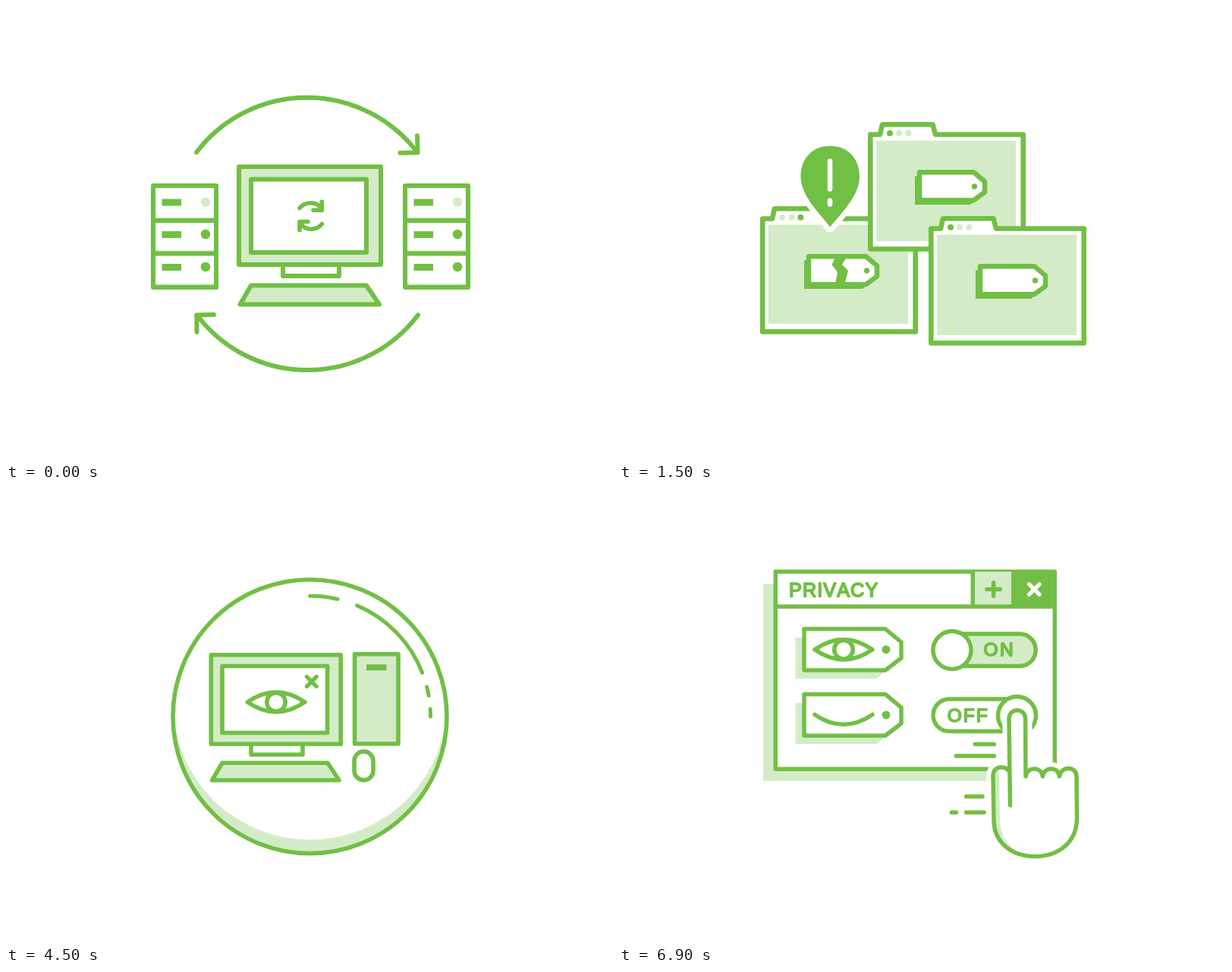
Animation, 800 px wide and 600 px high, one loop 7.5 s. Source, as an HTML page with a canvas:

```html
<!DOCTYPE html>
<html lang="en">
<head>
<meta charset="utf-8">
<title>Privacy icons</title>
<style>
html, body { margin: 0; width: 100%; height: 100%; overflow: hidden; background: #fff; }
canvas { display: block; width: 800px; height: 600px; }
</style>
</head>
<body>
<canvas id="stage" width="800" height="600"></canvas>
<script>
const ctx = document.getElementById('stage').getContext('2d');
const GREEN = '#71bf44', PALE = '#d4ebc8', WHITE = '#fff';
const HOLD = 1500;

// Basic drawing helpers
function fill(d, color = GREEN) {
  ctx.fillStyle = color;
  ctx.fill(new Path2D(d));
}
function line(d, w, color = GREEN) {
  ctx.strokeStyle = color;
  ctx.lineWidth = w;
  ctx.stroke(new Path2D(d));
}
function shape(d, w, color) {
  fill(d, color);
  line(d, w);
}
function box(l, t, r, b) {
  return `M${l} ${t}H${r}V${b}H${l}Z`;
}
function dot(x, y, r, color = GREEN) {
  ctx.fillStyle = color;
  ctx.beginPath();
  ctx.arc(x, y, r, 0, Math.PI * 2);
  ctx.fill();
}
function ring(x, y, r, w, color) {
  dot(x, y, r, color);
  ctx.strokeStyle = GREEN;
  ctx.lineWidth = w;
  ctx.stroke();
}
function cross(x, y, s, w, color) {
  line(`M${x - s} ${y - s}L${x + s} ${y + s}M${x + s} ${y - s}L${x - s} ${y + s}`, w, color);
}
function at(x, y, draw) {
  ctx.save();
  ctx.translate(x, y);
  draw();
  ctx.restore();
}

// Shared objects
function computer(w, frame, screen, stand, keys) {
  shape(box(...stand), w, WHITE);
  shape(box(...frame), w, PALE);
  shape(box(...screen), w, WHITE);
  shape(keys, w, PALE);
}
function tower(w, frame, slot) {
  shape(box(...frame), w, PALE);
  fill(box(...slot));
}
function mouse(x, y, wide, high, w) {
  ctx.beginPath();
  ctx.roundRect(x, y, wide, high, wide / 2);
  ctx.strokeStyle = GREEN;
  ctx.lineWidth = w;
  ctx.stroke();
}
function lids(x, y, rx, ry, w) {
  line(`M${x - rx} ${y}Q${x} ${y - 2 * ry} ${x + rx} ${y}Q${x} ${y + 2 * ry} ${x - rx} ${y}Z`, w);
}
function eye(x, y, rx, ry, r, w) {
  lids(x, y, rx, ry, w);
  ring(x, y, r, w, WHITE);
}

function server(x) {
  at(x, 0, () => {
    fill('M197 278.5H274V280.5H197ZM197 322H274V324H197ZM197 366H274V368H197Z', PALE);
    line(box(194, 237, 277, 371) + 'M194 283H277M194 326.5H277', 6);
    [258.5, 301, 344].forEach((y, i) => {
      fill(box(205.5, y - 4, 231, y + 5));
      dot(263, y, 6.3, i ? GREEN : PALE);
    });
  });
}

function sync() {
  line('M251 193A182.5 182.5 0 0 1 542 193M519.5 193.8L542.5 193.3L542 171', 6);
  line('M543 407.5A182.5 182.5 0 0 1 252 408M274 407L251.2 407.5L251.5 430', 6);
  server(0);
  server(332);
  computer(6, [307, 212, 494, 341], [323, 228.5, 475, 325], [365, 341, 439, 356],
    'M323 368.5H475L492 393.5H308.5Z');
  line('M387 266.5C394 257.5 409 257.5 416 267M405 269.2H416.3V258', 5.6);
  line('M416.5 287.5C409 296.5 395 296.5 388 287M398 284.5H387V295.5', 5.6);
}

function label(extra = 0) {
  const l = 396 - extra;
  fill(`M${l - 6} 224.5H${l}V256H469L463 262H${l - 6}Z`);
  shape(`M${l} 219.3H467.5L482 231.5V245.5L467.5 256.2H${l}Z`, 6.5, WHITE);
  dot(468.5, 238, 3.7);
}
function folder(dark, cut = 0) {
  shape(`M331.3 ${320.5 - cut}V169.5H344L347 156.3H413.5L417 169.5H532.7V${320.5 - cut}Z`, 6.6, WHITE);
  fill(box(339, 177.5, 523, 310 - cut), PALE);
  for (let i = 0; i < 3; i++) dot(357 + i * 12.2, 167.7, 4, i === dark ? GREEN : PALE);
}
function alert() {
  at(-142, 111, () => {
    folder(2, 2);
    label(4);
  });
  fill('M285 332H299.5L294 341L302 349L298 365H285.3L288 351L280.5 341Z');
  const pin = 'M278.2 291.5C269 278 239.5 252 239.5 225C239.5 200 256 184.5 278.2 184.5' +
    'S317 200 317 225C317 252 288 278 278.2 291.5Z';
  line(pin, 14, WHITE);
  fill(pin);
  line('M278 204.5V241.5M278 256.5V261.5', 6.6, WHITE);
  folder(0);
  label();
  at(80, 124, () => {
    folder(0);
    label();
  });
}

function trail(x1, y1, x2, y2, n) {
  for (let i = 0; i < n; i++) {
    const k = i / (n - 1);
    dot(x1 + (x2 - x1) * k, y1 + (y2 - y1) * k, 2.6);
  }
}
function watch() {
  computer(5, [293.5, 226.7, 449.5, 333.5], [307, 240, 433.5, 320.5], [342, 333.5, 404, 346.5],
    'M307 356.3H433.5L448 377.3H295Z');
  tower(5, [466, 226, 519, 333.2], [480, 238.5, 504.5, 245.5]);
  mouse(465.5, 342.5, 23.3, 35, 5);
  fill('M334 270H340V293H397L391 299H334Z', PALE);
  shape('M340 264.3H397L407.7 273.5V285L397 293.3H340Z', 5, WHITE);
  dot(397, 278.7, 3);
  eye(409.5, 176.5, 34.5, 11.8, 11.2, 5);
  eye(223, 301, 34.5, 11.8, 11.2, 5);
  eye(409.5, 423.7, 34.5, 11.8, 11.2, 5);
  lids(578, 301, 34.5, 11.8, 5);
  cross(578, 301, 5.8, 5);
  trail(346.5, 215.7, 375, 195.7, 5);
  trail(433.5, 195.7, 462, 215.7, 5);
  trail(252.5, 282, 280.5, 261, 5);
  trail(252.5, 320, 288, 345.5, 6);
  trail(528, 261, 556, 282, 5);
  trail(556, 320, 506.5, 355.7, 8);
  trail(352, 390, 373.5, 405.3, 4);
  trail(456.5, 390, 435, 405.3, 4);
}

function gloss(from, to) {
  ctx.beginPath();
  ctx.arc(400.5, 300, 159, from * Math.PI / 180, to * Math.PI / 180);
  ctx.strokeStyle = GREEN;
  ctx.lineWidth = 5;
  ctx.stroke();
}
function bubble() {
  dot(400.5, 300, 180.5, PALE);
  ctx.save();
  ctx.beginPath();
  ctx.arc(400.5, 300, 180.5, 0, Math.PI * 2);
  ctx.clip();
  dot(400.5, 282, 180.5, WHITE);
  ctx.restore();
  ring(400.5, 300, 180.5, 5.6, 'transparent');
  gloss(-90, -76.7);
  gloss(-67, -21.3);
  gloss(-14.2, -10);
  gloss(-3.5, 0);
  computer(5.6, [270.3, 218.7, 441.2, 336.3], [285, 233.5, 423.5, 321.5], [323, 336, 391, 350.3],
    'M285 361.3H424L439 384H271.5Z');
  tower(5.6, [459.5, 217.7, 517, 336], [475, 231.3, 501.5, 239.2]);
  mouse(459, 346, 25, 38, 5.6);
  eye(356, 281, 37.8, 13, 12.2, 5.6);
  cross(402.8, 254, 6.3, 5.4);
}

// Thin face with a round outline gives soft letter ends
function words(s, x, y, size, gap) {
  ctx.font = `${size}px "Liberation Sans", Arial, sans-serif`;
  ctx.letterSpacing = gap + 'px';
  ctx.fontKerning = 'none';
  ctx.fillStyle = ctx.strokeStyle = GREEN;
  ctx.lineWidth = 1.9;
  ctx.fillText(s, x, y);
  ctx.strokeText(s, x, y);
}
function tag() {
  fill('M232.5 196H244V239H351L340 250H232.5Z', PALE);
  shape('M244 184.5H351L372 202V223L351 239H244Z', 5.5, WHITE);
  dot(352, 211.7, 5.5);
}
function pill(y, color) {
  ctx.beginPath();
  ctx.roundRect(414, y, 135.2, 42.6, 21.3);
  ctx.fillStyle = color;
  ctx.strokeStyle = GREEN;
  ctx.lineWidth = 5.5;
  ctx.fill();
  ctx.stroke();
}
function hand() {
  const finger = 'L514 302.5A10.8 10.8 0 0 1 535.6 302.5L536 379';
  const knuckles = 'C538 365.5 556.5 365.5 558.5 379C560.5 365.5 578.5 365.5 580.5 379' +
    'C582 365 603 365 603 379';
  const palm = 'L603.5 434C603.5 466 579 484.5 548.5 484.5C517 484.5 494 466 494 436';
  const thumb = 'L493 378C493 364.5 511 363.5 515 374';
  const outline = 'M515 374' + finger + knuckles + palm + thumb + 'Z';
  line(outline, 17.5, WHITE);
  fill(outline, WHITE);
  fill('M494 376Q496 372 501 371L502 436C502 460 516 477 540 484C512 481 494 462 494 436Z', PALE);
  line('M515.5 417' + finger + knuckles + palm + thumb, 5.5);
}
function settings() {
  fill(box(190, 125, 560, 385), PALE);
  shape(box(206.3, 109, 574.3, 369.2), 5.5, WHITE);
  fill(box(466, 109, 520, 155), PALE);
  line('M206.3 155H574.3M466.3 109V155', 5.5);
  fill(box(517, 107, 576, 157));
  line('M484.8 132.3H502.4M493.6 123.5V141.1', 5.5);
  cross(547.3, 132.3, 6.8, 5.3, WHITE);
  words('PRIVACY', 224, 142.2, 25.2, 1.1);
  tag();
  at(0, 86.2, tag);
  eye(296, 211.7, 38, 13.2, 12.3, 5.5);
  line('M258 297.5Q296 323.5 334 297.5', 5.5);
  pill(191, PALE);
  ring(439, 212.5, 25, 5.5, WHITE);
  words('ON', 480.5, 220.3, 24.5, 2.4);
  pill(277, WHITE);
  ring(524.5, 298.7, 25, 5.5, WHITE);
  words('OFF', 432.7, 307, 24.5, 2);
  hand();
  line('M469.5 336.5H494.3M444.3 352H494.3M457.5 405.5H479M438.3 426.5H444.5M457.5 426.5H481', 5.5);
}

const scenes = [sync, alert, watch, bubble, settings];
const start = performance.now();
let shown = -1;

function tick() {
  const i = Math.floor((performance.now() - start) / HOLD) % scenes.length;
  if (i !== shown) {
    shown = i;
    ctx.fillStyle = WHITE;
    ctx.fillRect(0, 0, 800, 600);
    scenes[i]();
  }
  requestAnimationFrame(tick);
}
ctx.lineCap = ctx.lineJoin = 'round';
tick();
</script>
</body>
</html>
```
